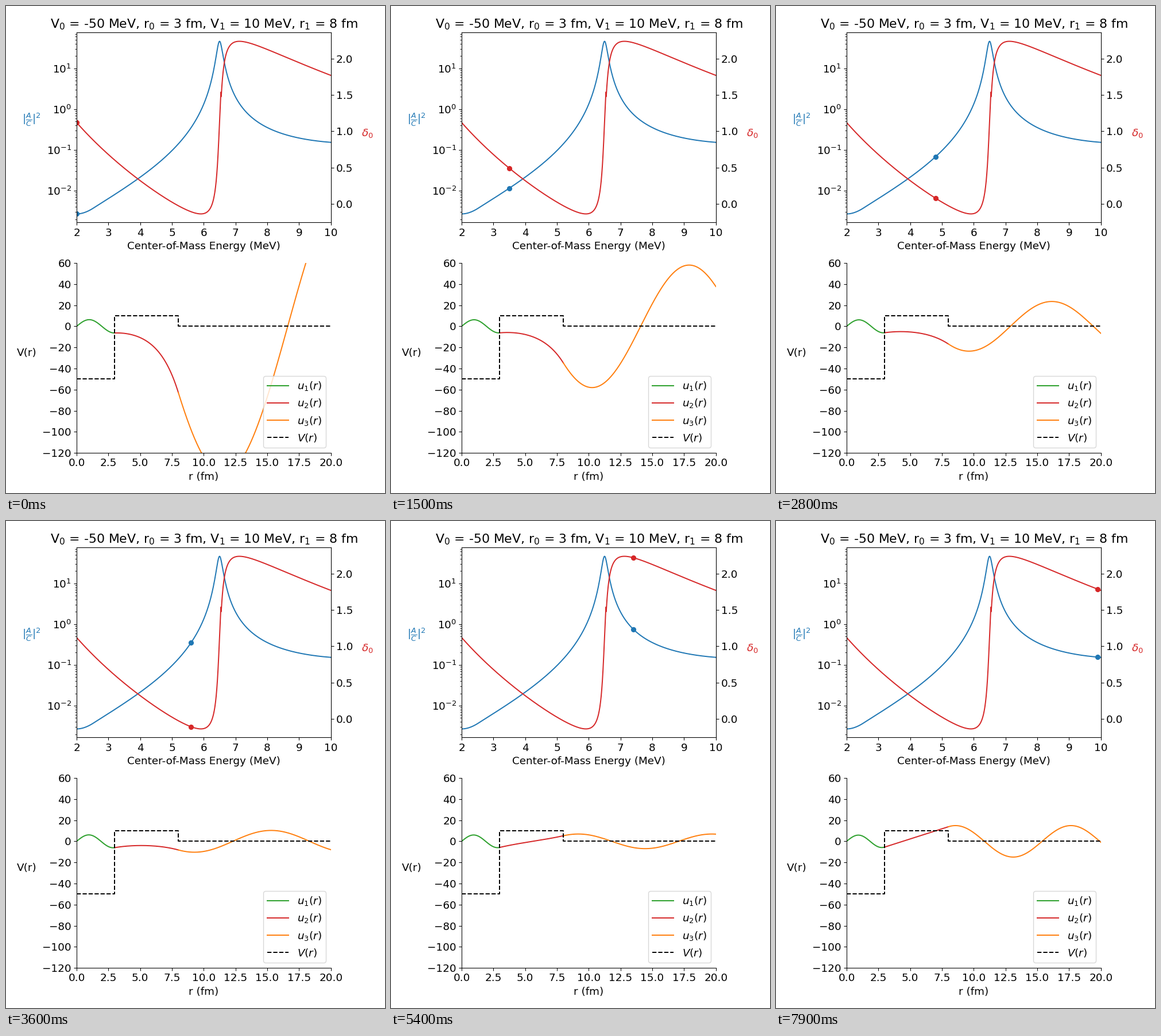
Animation of 660 by 849 pixels, one loop 8 s. Source, as a matplotlib script:

```python
import numpy as np
import matplotlib.pyplot as plt
from matplotlib.animation import FuncAnimation

WIDTH, HEIGHT = 660, 849
DPI = WIDTH / 7
FRAMES, INTERVAL = 80, 100

# Square well with a barrier: energies in MeV, lengths in fm
V0, R0, V1, R1, R_MAX = -50, 3, 10, 8, 20
MASS, HBAR_C = 938.27, 197
SLOPE = 10

plt.rcParams.update({"font.family": "DejaVu Sans", "font.size": 14})


def wave_number(kinetic):
    return np.sqrt(2 * MASS * kinetic) / HBAR_C


def inner(energy, r):
    k = wave_number(energy - V0)
    return SLOPE / k * np.sin(k * r), SLOPE * np.cos(k * r)


def barrier(energy, r):
    """Wave and its derivative under the barrier."""
    u, du = inner(energy, R0)
    q = wave_number(V1 - energy)
    c, s = np.cosh(q * (r - R0)), np.sinh(q * (r - R0))
    return u * c + du / q * s, u * q * s + du * c


def outer_phase(energy):
    """Amplitude, wave number and phase shift beyond the barrier."""
    u, du = barrier(energy, R1)
    k = wave_number(energy)
    return np.hypot(u, du / k), k, np.arctan2(u, du / k) - k * R1


def outer(energy, r):
    amplitude, k, phase = outer_phase(energy)
    return amplitude * np.sin(k * r + phase)


r1 = np.linspace(0, R0, 120)
r2 = np.linspace(R0, R1, 150)
r3 = np.linspace(R1, R_MAX, 400)
energies = 2 + 0.01 * np.arange(800)

# The outer amplitude is the highest crest inside the plotted range
crest = outer(energies[:, None], r3[None, :]).max(axis=1)
ratio = (SLOPE / wave_number(energies - V0) / crest) ** 2

# Principal branch of the phase shift, lifted by 3 after it wraps
shift = (outer_phase(energies)[2] + np.pi / 2) % np.pi - np.pi / 2
shift = np.where(shift < -0.5, shift + 3, shift)

fig = plt.figure(figsize=((WIDTH + 0.01) / DPI, (HEIGHT + 0.01) / DPI), dpi=DPI)


def add_axes(left, top, right, bottom):
    return fig.add_axes([left / WIDTH, 1 - bottom / HEIGHT,
                         (right - left) / WIDTH, (bottom - top) / HEIGHT])


def label(x, y, text, va="bottom", color="black"):
    fig.text(x / WIDTH, 1 - y / HEIGHT, text, ha="center", va=va, color=color)


ax_ratio = add_axes(123, 46.5, 565.7, 377.5)
ax_ratio.set_yscale("log")
ax_ratio.plot(energies, ratio, color="tab:blue")
ratio_dot, = ax_ratio.plot([], [], "o", color="tab:blue")
ax_ratio.set_xlim(2, 10)
ax_ratio.set_xticks(range(2, 11))
ax_ratio.set_xlabel("Center-of-Mass Energy (MeV)")
ax_ratio.set_title("V$_0$ = -50 MeV, r$_0$ = 3 fm, V$_1$ = 10 MeV, r$_1$ = 8 fm")
label(44.5, 212, r"$|\frac{A}{C}|^2$", color="tab:blue")

ax_shift = ax_ratio.twinx()
ax_shift.plot(energies, shift, color="tab:red")
shift_dot, = ax_shift.plot([], [], "o", color="tab:red")
ax_shift.set_yticks(np.arange(0, 2.1, 0.5))
label(629, 212, r"$\delta_0$", va="top", color="tab:red")

ax_wave = add_axes(123, 448, 565.7, 779.3)
ax_wave.spines[["top", "right"]].set_visible(False)
line1, = ax_wave.plot([], [], color="tab:green", label="$u_1(r)$")
line2, = ax_wave.plot([], [], color="tab:red", label="$u_2(r)$")
line3, = ax_wave.plot([], [], color="tab:orange", label="$u_3(r)$")
ax_wave.plot([0, R0, R0, R1, R1, R_MAX], [V0, V0, V1, V1, 0, 0],
             "--", color="black", label="$V(r)$")
ax_wave.set_xlim(0, R_MAX)
ax_wave.set_xticks(np.arange(0, 20.1, 2.5))
ax_wave.set_ylim(-120, 60)
ax_wave.set_yticks(range(-120, 61, 20))
ax_wave.set_xlabel("r (fm)")
ax_wave.legend(loc="lower right")
label(36.5, 613.7, "V(r)")


def update(frame):
    i = 10 * frame
    energy = energies[i]
    ratio_dot.set_data([energy], [ratio[i]])
    shift_dot.set_data([energy], [shift[i]])
    line1.set_data(r1, inner(energy, r1)[0])
    line2.set_data(r2, barrier(energy, r2)[0])
    line3.set_data(r3, outer(energy, r3))
    return ratio_dot, shift_dot, line1, line2, line3


anim = FuncAnimation(fig, update, frames=FRAMES, interval=INTERVAL,
                     repeat=True, repeat_delay=0)
plt.show()
```
